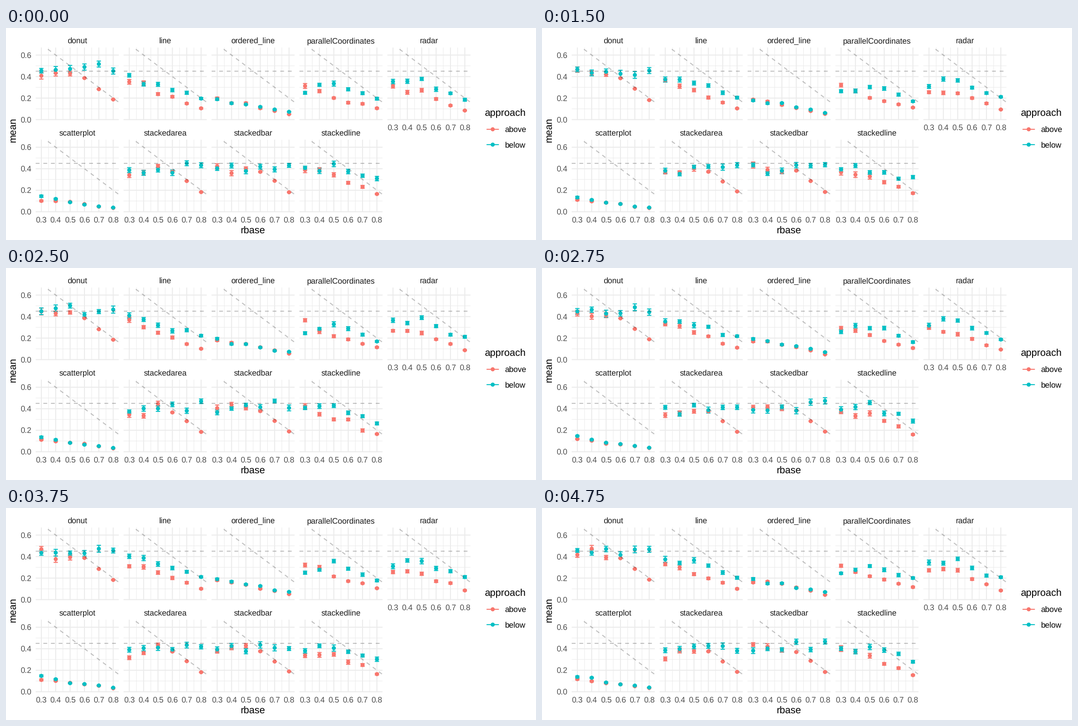
Animation, 1183 px wide and 473 px high, one loop 5000 ms. Source, as a matplotlib script:

```python
import numpy as np
import matplotlib.pyplot as plt
from matplotlib.animation import FuncAnimation
from matplotlib.patches import Rectangle

W, H, DPI = 1183, 473, 64
FRAMES, INTERVAL = 20, 250
PT = 72 / DPI  # points per pixel

plt.rcParams.update({
    "font.family": "Liberation Sans",
    "text.hinting": "none",
    "path.snap": False,
    "path.simplify": False,
})

COLORS = ("#F8766D", "#00BFC4")
APPROACHES = ("above", "below")
GRID, TICK, STRIP = "#EBEBEB", "#4D4D4D", "#1A1A1A"
RBASE = np.arange(0.3, 0.85, 0.1)

# Trend of each panel: "above" then "below", at rbase 0.3, 0.5 and 0.8
KEY_R = (0.3, 0.5, 0.8)
TRENDS = {
    "donut": ((.44, .41, .40), (.435, .45, .47)),
    "line": ((.35, .26, .105), (.40, .35, .205)),
    "ordered_line": ((.18, .138, .05), (.19, .138, .07)),
    "parallelCoordinates": ((.33, .21, .11), (.25, .33, .18)),
    "radar": ((.28, .245, .09), (.33, .35, .20)),
    "scatterplot": ((.114, .084, .033), (.15, .084, .037)),
    "stackedarea": ((.345, .41, .30), (.37, .40, .43)),
    "stackedbar": ((.41, .395, .33), (.395, .41, .43)),
    "stackedline": ((.38, .34, .165), (.38, .41, .29)),
}
NAMES = list(TRENDS)

# Panel geometry in pixels
LEFT, RIGHT, TOP, BOTTOM = 66.3, 251.8, 43.6, 205.4
DX, DY = 196.22, 205.6
CAP = 4.8
X_UNIT, Y_UNIT = 320.8, 240

fig = plt.figure(figsize=(W / DPI, H / DPI), dpi=DPI, facecolor="white")
ax = fig.add_axes([0, 0, 1, 1])
ax.set(xlim=(0, W), ylim=(H, 0))
ax.axis("off")


def offset(i):
    return DX * (i % 5), DY * (i // 5)


def px(r):
    return 78.9 + (r - 0.3) * X_UNIT


def py(v):
    return 204.4 - v * Y_UNIT


def stroke(x, y, color, width, **kw):
    kw.setdefault("solid_capstyle", "butt")
    return ax.plot(x, y, color=color, lw=width * PT, **kw)[0]


def label(x, y, s, size=17.6, color="black", **kw):
    ax.text(x, y, s, size=size * PT, color=color, va="baseline", **kw)


def draw_panel(i):
    ox, oy = offset(i)
    xs, ys = [LEFT + ox, RIGHT + ox], [TOP + oy, BOTTOM + oy]

    def grid(values, rs, width):
        for v in values:
            stroke(xs, [py(v) + oy] * 2, GRID, width, zorder=1)
        for r in rs:
            stroke([px(r) + ox] * 2, ys, GRID, width, zorder=1)

    grid((0.1, 0.3, 0.5), RBASE[:-1] + 0.05, 1.07)
    grid((0, 0.2, 0.4, 0.6), RBASE, 2.13)

    # Reference lines: constant 0.45 and 1 - rbase, above the data
    clip = Rectangle((xs[0], ys[0]), xs[1] - xs[0], ys[1] - ys[0],
                     transform=ax.transData)
    edges = 0.3 + (np.array([LEFT, RIGHT]) - px(0.3)) / X_UNIT
    for v in (np.full(2, 0.45), 1 - edges):
        ref = stroke(xs, py(v) + oy, "black", 2.13, alpha=0.25, zorder=6,
                     linestyle=(0, (4, 4)), dash_capstyle="butt")
        ref.set_clip_path(clip)

    label(sum(xs) / 2, 33.8 + oy, NAMES[i], color=STRIP, ha="center")
    if i >= 4:
        for r in RBASE:
            label(px(r) + ox, 228.2 + oy, f"{r:.1f}", color=TICK, ha="center")
    if i % 5 == 0:
        for v in (0, 0.2, 0.4, 0.6):
            label(57, py(v) + oy + 6.3, f"{v:.1f}", color=TICK, ha="right")


def bars_xy(x, y, e):
    """I-shaped error bars joined into one path with gaps."""
    gap = np.full_like(x, np.nan)
    lo, hi = y + e, y - e
    bx = [x - CAP, x + CAP, gap, x, x, gap, x - CAP, x + CAP, gap]
    by = [hi, hi, gap, hi, lo, gap, lo, lo, gap]
    return np.stack(bx, 1).ravel(), np.stack(by, 1).ravel()


def dots_xy(x, y):
    """Tiny round-capped strokes, which render as sub-pixel placed discs."""
    gap = np.full_like(x, np.nan)
    return (np.stack([x - 0.01, x + 0.01, gap], 1).ravel(),
            np.stack([y, y, gap], 1).ravel())


def draw_legend():
    label(1067.9, 196.6, "approach", 22)
    for k, name in enumerate(APPROACHES):
        y = 226 + 34.2 * k
        stroke([1072.6, 1100.2], [y, y], COLORS[k], 2.13)
        stroke(*dots_xy(np.array([1086.4]), np.array([y])), COLORS[k], 9.2,
               solid_capstyle="round")
        label(1113.5, y + 6.2, name)


for i in range(len(NAMES)):
    draw_panel(i)
label(551.3, 458.4, "rbase", 22, ha="center")
label(22.3, 227, "mean", 22, ha="center", rotation=90, rotation_mode="anchor")
draw_legend()

# Means and errors have shape (panel, approach, rbase)
MEAN = np.array([[np.interp(RBASE, KEY_R, t) for t in pair]
                 for pair in TRENDS.values()])
ERROR = 0.058 * MEAN
# "above" is bounded by just under 1 - rbase, and varies little near it
LIMIT = 0.985 - RBASE
MEAN[:, 0] = np.minimum(MEAN[:, 0], LIMIT)
ERROR[:, 0] = np.minimum(ERROR[:, 0], 0.002 + 0.25 * (LIMIT - MEAN[:, 0]))

SHIFT = np.array([offset(i) for i in range(len(NAMES))])
X = (px(RBASE) + SHIFT[:, :1]).ravel()

bars = [stroke([], [], c, 2.13, zorder=3) for c in COLORS]
dots = [stroke([], [], c, 9.2, zorder=4 + k / 2, solid_capstyle="round")
        for k, c in enumerate(COLORS)]


def update(n):
    # Each step is a fresh resample: means scatter by about their own error
    rng = np.random.default_rng(100 + n)
    z = np.clip(rng.standard_normal(MEAN.shape), -1.8, 1.8)
    mean = MEAN + 1.1 * ERROR * z
    err = ERROR * rng.uniform(0.7, 1.25, MEAN.shape) * Y_UNIT
    for k in range(2):
        y = (py(mean[:, k]) + SHIFT[:, 1:]).ravel()
        bars[k].set_data(*bars_xy(X, y, err[:, k].ravel()))
        dots[k].set_data(*dots_xy(X, y))
    return bars + dots


anim = FuncAnimation(fig, update, frames=FRAMES, interval=INTERVAL,
                     init_func=lambda: update(0), repeat=True, repeat_delay=0)
plt.show()
```
